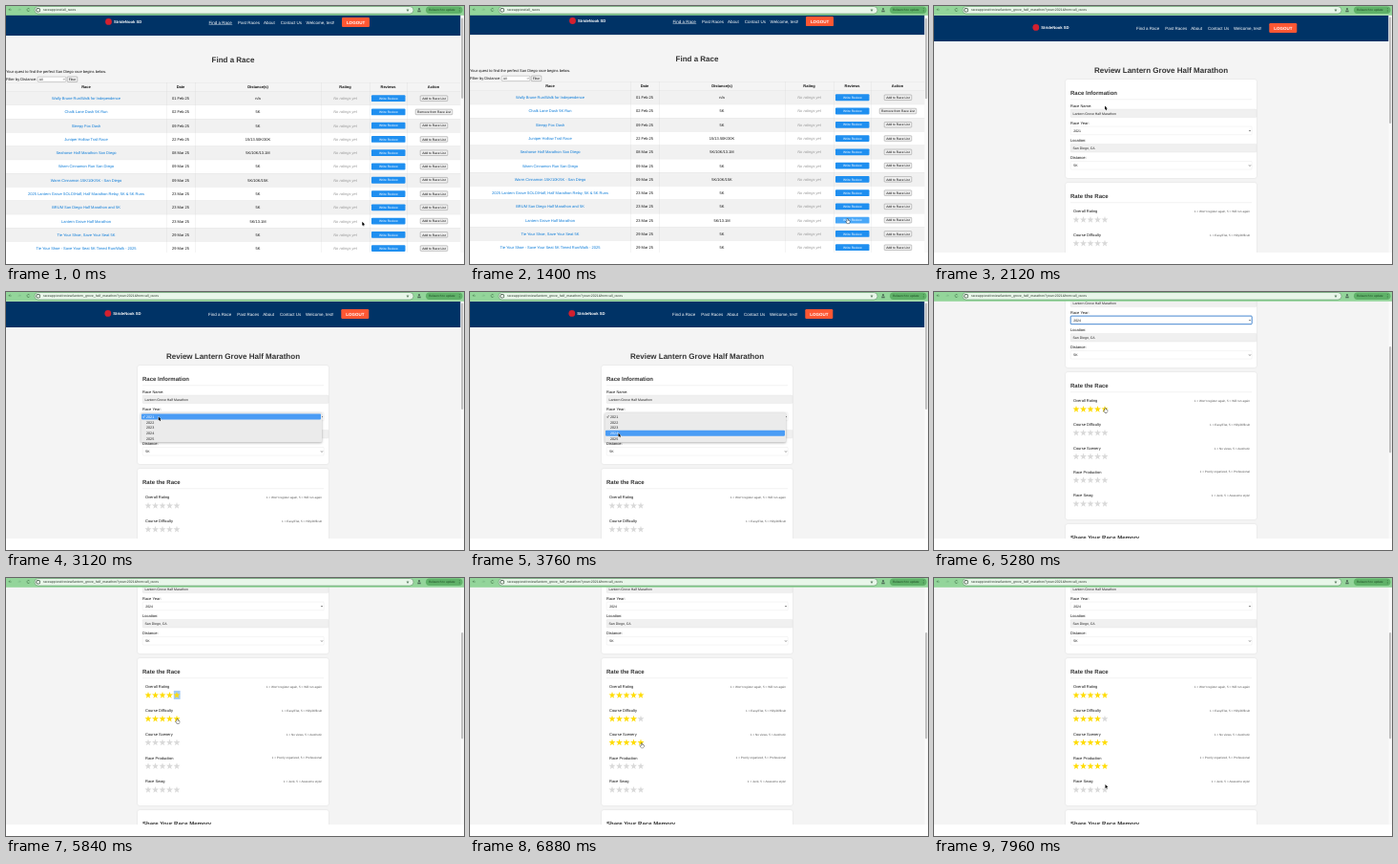
Animation of 480 by 270 pixels, one loop 8 s. Source, as an HTML page with a canvas:

```html
<!DOCTYPE html>
<html lang="en">
<head>
<meta charset="utf-8">
<title>Race reviews</title>
<style>
html, body { margin: 0; width: 100%; height: 100%; overflow: hidden; background: #fff; }
canvas { display: block; width: 480px; height: 270px; }
</style>
</head>
<body>
<canvas id="stage"></canvas>
<script>
const W = 480, H = 270, LOOP = 8000, VIEW_BOTTOM = 258;
const canvas = document.getElementById('stage');
const ctx = canvas.getContext('2d');
const dpr = window.devicePixelRatio || 1;
canvas.width = W * dpr;
canvas.height = H * dpr;

const LOAD = 1640, MENU_OPEN = 3040, MENU_PICK = 3960;
const EVENT = 'Lantern Grove Half Marathon';

// time, x, y
const cursorPath = [
  [0, 373.3, 225.7], [520, 373.3, 225.7], [1280, 395.3, 222.8], [1720, 395.3, 222.8],
  [2080, 179, 104.5], [2240, 179, 104.5], [2680, 160, 130], [3080, 160, 130],
  [3320, 157, 136], [3600, 155.5, 147.5], [3960, 155.5, 147.5], [4240, 117.7, 154.5],
  [4440, 117.7, 154.5], [4690, 148, 150], [4980, 151, 122], [5240, 179.2, 121.5],
  [5480, 179.2, 121.5], [5760, 179.2, 147.7], [5960, 179.2, 147.7], [6200, 172, 147.7],
  [6360, 172, 147.7], [6640, 179.5, 172], [6840, 179.5, 172], [7200, 179.5, 196.5],
  [7440, 179.5, 196.5], [7760, 179.5, 216], [8000, 179.5, 216]
];
const listScroll = [[0, 6], [520, 6], [760, 6.9], [LOAD, 6.9]];
const formScroll = [[4120, 0], [4340, 43.9], [4400, 43.9], [4660, 101]];

const races = [
  ['Wally Brune Run/Walk for Independence', '01 Feb 25', 'n/a'],
  ['Chalk Lane Dash 5K Run', '02 Feb 25', '5K'],
  ['Sleepy Fox Dash', '09 Feb 25', '5K'],
  ['Juniper Hollow Trail Race', '22 Feb 25', '15/13.50K/30K'],
  ['Seahorse Half Marathon San Diego', '08 Mar 25', '5K/10K/13.1M'],
  ['Warm Cinnamon Run San Diego', '09 Mar 25', '5K'],
  ['Warm Cinnamon 15K/10K/5K - San Diego', '09 Mar 25', '5K/10K/15K'],
  ['2025 Lantern Grove SOLO/Half, Half Marathon Relay, 5K & 5K Runs', '23 Mar 25', '5K'],
  ['BRUM San Diego Half Marathon and 5K', '23 Mar 25', '5K'],
  [EVENT, '23 Mar 25', '5K/13.1M'],
  ['Tie Your Shoe, Save Your Seat 5K', '29 Mar 25', '5K'],
  ['Tie Your Shoe - Save Your Seat 5K Timed Run/Walk - 2025', '29 Mar 25', '5K']
];

// label, hint, chosen stars, time of the choice
const ratings = [
  ['Overall Rating', "1 = Won't register again, 5 = Will run again", 5, 5320],
  ['Course Difficulty', '1 = Easy/Flat, 5 = Hilly/Difficult', 4, 6280],
  ['Course Scenery', '1 = No views, 5 = Aesthetic', 5, 6760],
  ['Race Production', '1 = Poorly organized, 5 = Professional', 5, 7320],
  ['Race Swag', '1 = Junk, 5 = Awesome style!', 0, Infinity]
];

const smooth = k => k * k * (3 - 2 * k);
const linear = k => k;

function sample(keys, t, ease) {
  if (t <= keys[0][0]) return keys[0].slice(1);
  for (let i = 1; i < keys.length; i++) {
    const a = keys[i - 1], b = keys[i];
    if (t < b[0]) {
      const k = ease((t - a[0]) / (b[0] - a[0]));
      return a.slice(1).map((v, j) => v + (b[j + 1] - v) * k);
    }
  }
  return keys[keys.length - 1].slice(1);
}

// y is the middle of the capitals
function text(str, x, y, size = 4, color = '#111', align = 'left', style = '') {
  ctx.font = `${style} ${size}px "Liberation Sans", Arial, sans-serif`;
  ctx.textAlign = align;
  ctx.fillStyle = color;
  ctx.fillText(str, x, y + size * 0.36);
}

function rect(x, y, w, h, color) {
  ctx.fillStyle = color;
  ctx.fillRect(x, y, w, h);
}

function box(x, y, w, h, r, fill, border, line = 0.3) {
  ctx.beginPath();
  ctx.roundRect(x, y, w, h, r);
  ctx.fillStyle = fill;
  ctx.fill();
  if (border) stroke(border, line);
}

function stroke(color, width) {
  ctx.strokeStyle = color;
  ctx.lineWidth = width;
  ctx.stroke();
}

function poly(points) {
  ctx.beginPath();
  points.forEach(([x, y]) => ctx.lineTo(x, y));
}

function circle(x, y, r, color) {
  ctx.beginPath();
  ctx.arc(x, y, r, 0, Math.PI * 2);
  ctx.fillStyle = color;
  ctx.fill();
}

function star(x, y, r, color) {
  poly(Array.from({ length: 10 }, (_, i) => {
    const a = i * Math.PI / 5 - Math.PI / 2, d = i % 2 ? r * 0.39 : r;
    return [x + Math.cos(a) * d, y + Math.sin(a) * d];
  }));
  ctx.closePath();
  ctx.fillStyle = color;
  ctx.fill();
}

function browserBar(url) {
  rect(0, 0, W, 9.8, '#93d59a');
  poly([[5.6, 4], [2.8, 4], [4.2, 2.6]]); stroke('#2d5a35', 0.5);
  poly([[12.6, 4], [15.4, 4], [14, 2.6]]); stroke('#6fa878', 0.5);
  ctx.beginPath();
  ctx.arc(23.5, 4, 1.5, 0.4, 5.6);
  stroke('#2d5a35', 0.5);
  box(30, 0.5, 397, 7.6, 3.8, '#e8f6e9', '#4c8055', 0.5);
  circle(33.7, 4.2, 2.3, '#3b5640');
  circle(33.7, 4.2, 1.5, '#f4fbf4');
  text(url, 39, 4.2, 3.5, '#2c3a2e');
  star(421, 4.2, 1.8, '#5d7f63');
  circle(433, 3.2, 1.1, '#50715a');
  rect(431.3, 4.6, 3.4, 1.7, '#50715a');
  box(440, 0.5, 38.5, 7.4, 3.7, '#5fb168');
  text('Relaunch to update', 443, 4.2, 3.2, '#1d4a25');
  for (const y of [2.6, 4.2, 5.8]) circle(475.2, y, 0.4, '#1d4a25');
}

function siteHeader(top, shift, active) {
  const y = top + 13;
  rect(0, top, 476.5, 27, '#003366');
  circle(107.5 + shift, y - 0.6, 3.4, '#d3202f');
  text('StrideNook SD', 113 + shift, y - 0.6, 4.2, '#fff', 'left', 'bold');
  const nav = [['Find a Race', 212.6], ['Past Races', 243], ['About', 270],
    ['Contact Us', 287.7], ['Welcome, test!', 314.6]];
  for (const [label, x] of nav) text(label, x + shift, y, 4.5, '#fff');
  if (active) rect(212.6, y + 2.1, 24.6, 0.4, '#fff');
  box(352 + shift, y - 5, 29, 10, 1.2, '#ff5733');
  text('LOGOUT', 366.5 + shift, y, 4.5, '#fff', 'center', 'bold');
}

function scrollbar(top, length) {
  rect(476.5, 9.8, 3.5, VIEW_BOTTOM - 9.8, '#fafafa');
  box(477, top, 2.2, length, 1.1, '#c1c1c1');
}

function plainButton(label, x, y, w) {
  box(x - w / 2, y - 2.8, w, 5.6, 0.7, '#f0f0f0', '#666', 0.35);
  text(label, x, y, 3.33, '#000', 'center');
}

function listPage(scroll, cursor) {
  const top = 9.8 - scroll + 0.2;
  const at = y => y - scroll;
  siteHeader(top, 0, true);
  text('Find a Race', 238, at(62), 8, '#333', 'center', 'bold');
  text('Your quest to find the perfect San Diego race begins below.', 0, at(74.2));
  text('Filter by Distance:', 0, at(82.7));
  box(33.3, at(80.1), 29.5, 5.2, 0.6, '#fff', '#777', 0.35);
  text('All', 34.8, at(82.7), 3.33);
  poly([[60, at(82.2)], [60.8, at(83.2)], [61.6, at(82.2)]]);
  stroke('#222', 0.4);
  plainButton('Filter', 69.5, at(82.7), 10.6);

  const first = at(95.5), pitch = 14.27;
  const heads = [['Race', 84], ['Date', 183], ['Distance(s)', 264], ['Rating', 355.5],
    ['Reviews', 400.5], ['Action', 448]];
  for (const [label, x] of heads) text(label, x, at(90.7), 4, '#111', 'center', 'bold');

  races.forEach(([name, date, distance], i) => {
    const rowTop = first + i * pitch, y = rowTop + pitch / 2;
    rect(0, rowTop, 476.5, pitch, i % 2 ? '#fff' : '#f1f1f1');
    rect(0, rowTop, 476.5, 0.25, '#d6d6d6');
    text(name, 84, y, 4, '#0b7bd8', 'center');
    text(date, 183, y, 4, '#111', 'center');
    text(distance, 264, y, 4, '#111', 'center');
    text('No ratings yet', 355.5, y, 4, '#999', 'center', 'italic');
    const hover = Math.abs(cursor.x - 400.5) < 17.5 && Math.abs(cursor.y - y) < 3.3;
    box(383, y - 3.4, 35.5, 6.8, 0.9, hover ? '#4aa8f8' : '#1f8ff0');
    text('Write Review', 400.8, y, 3.33, '#fff', 'center');
    if (i === 1) plainButton('Remove from Race List', 448.5, y, 38.6);
    else plainButton('Add to Race List', 448.5, y, 28.6);
  });
  rect(0, at(86), 476.5, 0.25, '#d6d6d6');
  for (const x of [168, 198, 330, 381, 420]) rect(x, at(86), 0.25, 190, '#d0d0d0');
  scrollbar(10 + scroll * 0.4, 84.5);
}

function card(y, h, title) {
  ctx.save();
  ctx.shadowColor = 'rgba(0,0,0,.12)';
  ctx.shadowBlur = 2 * dpr;
  box(138, y, 200, h, 2, '#fff');
  ctx.restore();
  text(title, 143, y + 13.7, 6, '#333', 'left', 'bold');
  rect(143, y + 20.7, 190, 0.4, '#ddd');
}

function field(label, value, y, select, focus) {
  text(label, 143, y);
  const top = y + 3.7;
  if (select) {
    box(143.2, top, 190, 8.6, 0.8, '#fff', focus ? '#1769c4' : '#ddd', focus ? 0.8 : 0.3);
    poly([[330, top + 3.9], [331, top + 5], [332, top + 3.9]]);
    stroke('#222', 0.5);
    text(value, 146.2, top + 4.4, 3.5);
  } else {
    box(143.2, top, 194.8, 8.6, 0.8, '#f0f0f0', '#ddd');
    text(value, 145.5, top + 4.3, 3.5, '#222');
  }
}

function yearMenu(cursor) {
  ctx.save();
  ctx.shadowColor = 'rgba(0,0,0,.35)';
  ctx.shadowBlur = 2.5 * dpr;
  ctx.shadowOffsetY = 0.8 * dpr;
  box(141.3, 126.3, 189.7, 31, 1.4, '#ebebeb');
  ctx.restore();
  for (let i = 0; i < 5; i++) {
    const y = 130.5 + i * 5.75;
    const hover = Math.abs(cursor.y + 0.3 - y) < 2.875;
    if (hover) box(142, y - 2.9, 188, 5.8, 0.8, '#4a9cf5');
    text(String(2021 + i), 147, y, 3.7, hover ? '#fff' : '#222');
    if (i === 0) {
      poly([[143.4, y], [144.2, y + 1.1], [145.5, y - 1.4]]);
      stroke(hover ? '#fff' : '#222', 0.5);
    }
  }
}

function hoveredStars(cursor, y) {
  const inside = cursor.x > 145.2 && cursor.x < 182.8 && Math.abs(cursor.y - y) < 4.2;
  return inside ? Math.floor((cursor.x - 145.2) / 7.5) + 1 : 0;
}

function formPage(t, scroll, cursor) {
  ctx.save();
  ctx.translate(0, -scroll);
  const local = { x: cursor.x, y: cursor.y + scroll };
  siteHeader(10, -0.7, false);
  text('Review ' + EVENT, 238, 67.3, 8, '#333', 'center', 'bold');

  card(77, 103, 'Race Information');
  const picked = t >= MENU_PICK;
  field('Race Name:', EVENT, 104.3, false);
  field('Race Year:', picked ? '2024' : '2021', 122.4, true, picked && t < ratings[0][3]);
  field('Location:', 'San Diego, CA', 140.7, false);
  field('Distance:', '5K', 158.8, true);

  card(185, 154, 'Rate the Race');
  ratings.forEach(([label, hint, score, time], i) => {
    const y = 215 + i * 24.75, starY = y + 8.5;
    text(label, 146, y);
    text(hint, 331, y, 3.1, '#555', 'right');
    if (i === 0 && t >= time && t < ratings[1][3]) rect(175.8, starY - 4.6, 6.8, 9, '#a3c9f5');
    const lit = hoveredStars(local, starY) || (t >= time ? score : 0);
    for (let n = 0; n < 5; n++) {
      star(149 + n * 7.5, starY + 0.2, 3.7, n < lit ? '#ffdc00' : '#d9d9d9');
    }
  });

  card(344, 100, 'Share Your Race Memory');
  ctx.restore();
  if (t >= MENU_OPEN && t < MENU_PICK) yearMenu(cursor);
  scrollbar(11.5 + scroll * 0.45, 111.5);
}

function drawCursor({ x, y }, hand) {
  ctx.save();
  ctx.translate(x, y);
  if (hand) {
    poly([[0, 0], [0.8, 0], [0.8, 1.6], [2.6, 2], [2.4, 4], [1.9, 4.8], [0, 4.8], [-1.3, 2.8], [-0.9, 2.4], [0, 3]]);
    ctx.closePath();
    stroke('#111', 0.8);
    ctx.fillStyle = '#fff';
  } else {
    poly([[0, 0], [0, 4], [0.9, 3.2], [1.5, 4.7], [2.2, 4.4], [1.6, 3], [2.8, 2.9]]);
    ctx.closePath();
    stroke('#fff', 0.7);
    ctx.fillStyle = '#000';
  }
  ctx.fill();
  ctx.restore();
}

function draw(t) {
  const [x, y] = sample(cursorPath, t, smooth);
  const cursor = { x, y };
  const onList = t < LOAD;
  ctx.setTransform(dpr, 0, 0, dpr, 0, 0);
  ctx.textRendering = 'geometricPrecision';
  rect(0, 0, W, H, '#fff');
  ctx.save();
  ctx.beginPath();
  ctx.rect(0, 0, W, VIEW_BOTTOM);
  ctx.clip();
  rect(0, 0, W, VIEW_BOTTOM, '#f4f4f4');
  let hand;
  if (onList) {
    listPage(sample(listScroll, t, smooth)[0], cursor);
    hand = x > 383;
  } else {
    formPage(t, sample(formScroll, t, linear)[0], cursor);
    hand = t > 4700 && ratings.some((_, i) => hoveredStars(cursor, 122.5 + i * 24.75));
  }
  browserBar(onList ? 'raceapp.test/all_races' : 'raceapp.test/review/lantern_grove_half_marathon?year=2021&from=all_races');
  drawCursor(cursor, hand);
  ctx.restore();
}

const start = performance.now();
function tick() {
  draw((performance.now() - start) % LOOP);
  requestAnimationFrame(tick);
}
tick();
</script>
</body>
</html>
```
